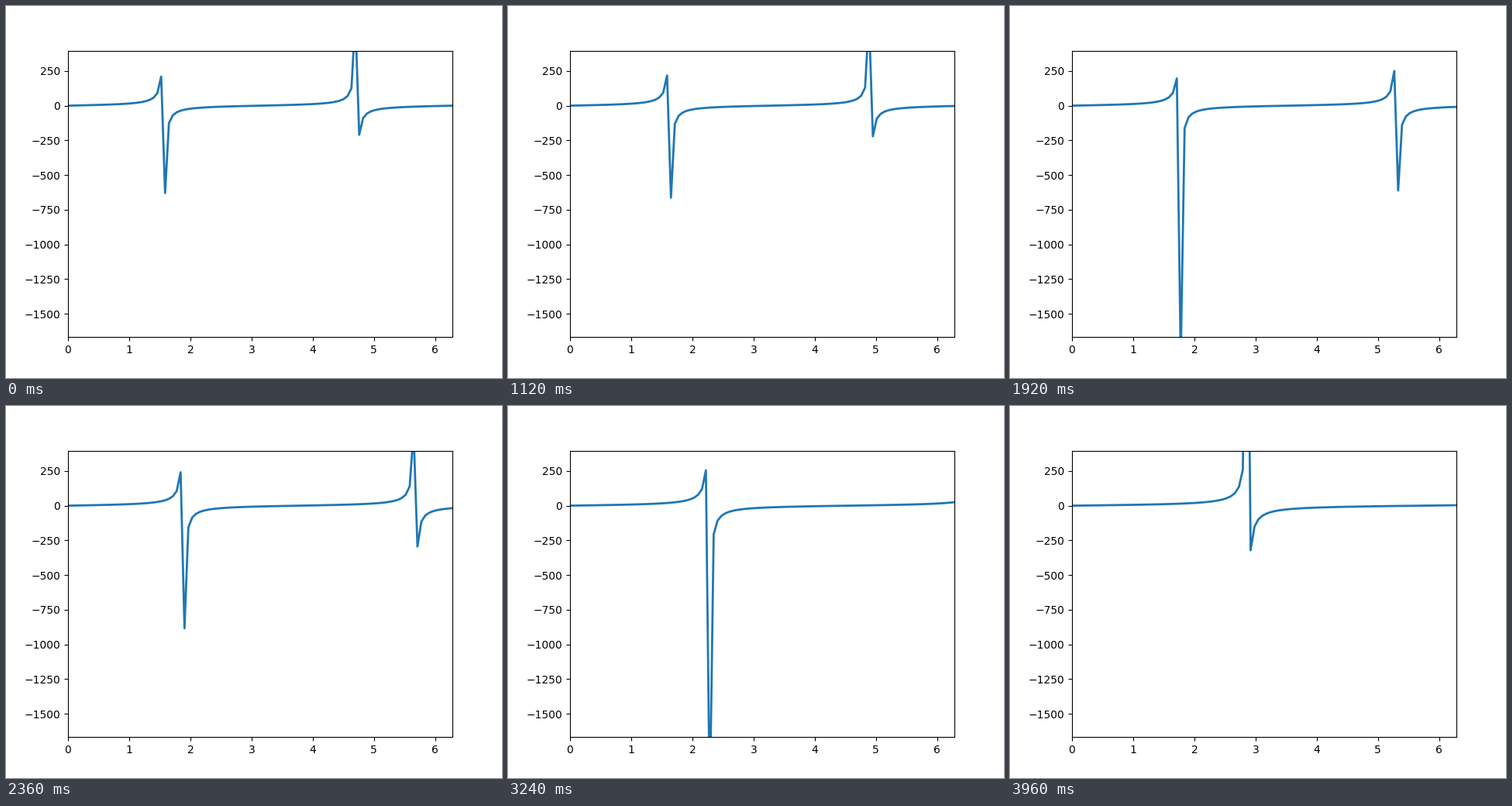
Write a matplotlib script that moves like this. It is 640 px wide and 480 px high and loops after 4 s.

```python
import numpy as np
import matplotlib.pyplot as plt
from matplotlib.animation import FuncAnimation

FRAMES = 100
INTERVAL = 40

x = np.linspace(0, 2 * np.pi, 100)


def curve(i):
    """Tangent whose frequency slowly drops along a cosine."""
    return 10 * np.tan(x * np.cos(i / 100))


fig, ax = plt.subplots(figsize=(6.4, 4.8), dpi=100)
ax.set_xlim(0, 2 * np.pi)
ax.set_ylim(-1668, 396.6)
line, = ax.plot(x, curve(0), color="#1f77b4", lw=2)


def init():
    line.set_ydata(curve(0))
    return line,


def update(i):
    line.set_ydata(curve(i))
    return line,


anim = FuncAnimation(fig, update, frames=FRAMES, init_func=init,
                     interval=INTERVAL, repeat=True, repeat_delay=0)
plt.show()
```
